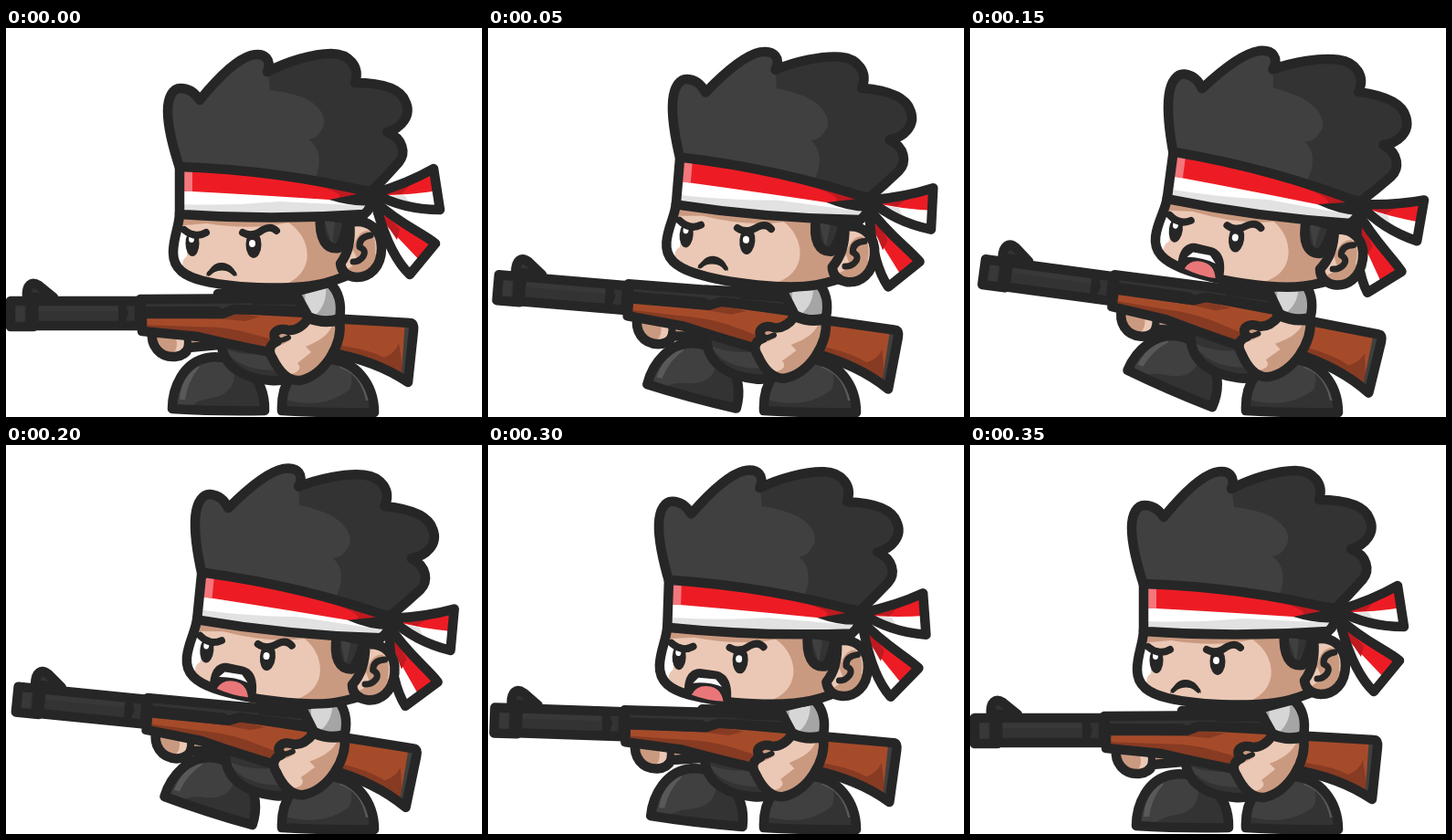
An HTML page with a canvas for the animation above (0.5 s loop, 521 by 426 pixels).

```html
<!DOCTYPE html>
<html lang="en">
<head>
<meta charset="utf-8">
<title>Recoil</title>
<style>
html, body { margin: 0; width: 100%; height: 100%; overflow: hidden; background: #fff; }
canvas { display: block; }
</style>
</head>
<body>
<canvas id="stage" width="521" height="426"></canvas>
<script>
const ctx = document.getElementById('stage').getContext('2d');
const INK = '#262626', DARK = '#333', SOFT = '#404040', SHINE = '#595959';
const SKIN = '#ebc8b5', TAN = '#ca9a80';
const RED = '#ed1c24', CRIMSON = '#be1a20', GREY = '#e2e2e2';
const WOOD = '#a64b2a', BROWN = '#873b22';
const STEP = 50, LOOP = 500, PEAK = 2, REST = 7;

function fill(d, color) {
  ctx.fillStyle = color;
  ctx.fill(new Path2D(d));
}

function line(d, width = 10.5, color = INK) {
  ctx.lineWidth = width;
  ctx.strokeStyle = color;
  ctx.stroke(new Path2D(d));
}

function oval(x, y, rx, ry, color) {
  ctx.fillStyle = color;
  ctx.beginPath();
  ctx.ellipse(x, y, rx, ry, 0, 0, Math.PI * 2);
  ctx.fill();
}

// Flat shape with clipped [path, color] shades and an ink outline.
function shape(d, color, ...shades) {
  ctx.save();
  fill(d, color);
  ctx.clip(new Path2D(d));
  shades.forEach(shade => fill(...shade));
  ctx.restore();
  line(d);
}

// Turns about (x, y) while sliding by (dx, dy); p is the amount of recoil.
function pose(p, x, y, dx, dy, degrees, draw) {
  ctx.save();
  ctx.translate(x + dx * p, y + dy * p);
  ctx.rotate(degrees * p * Math.PI / 180);
  ctx.translate(-x, -y);
  draw();
  ctx.restore();
}

function frontFoot() {
  shape('M182 417C182 394 194 366 221 361C254 356 284 382 283 419Q230 420 182 417Z', DARK,
    ['M180 425V355H235C258 372 254 400 226 405Q202 408 196 425Z', SOFT],
    ['M190 407Q192 382 208 369L212 371Q199 386 196 407Z', SHINE]);
}

function backFoot() {
  shape('M302 419C301 390 315 364 349 363C384 362 403 392 403 421Q350 422 302 419Z', DARK,
    ['M300 405Q345 420 376 396Q384 378 366 360L300 355Z', SOFT],
    ['M365 372Q388 379 394 408L397 408Q397 380 367 368Z', SHINE]);
}

function torso() {
  shape('M232 291H332L328 352C323 378 309 388 290 386C261 384 240 372 236 349Z', DARK,
    ['M237 350Q260 361 289 356L298 374Q258 378 237 350Z', SOFT]);
}

function farHand() {
  shape('M160 332C158 348 168 361 185 360Q196 359 200 350L233 347L235 333Z', TAN,
    ['M184 335H195V352L182 358Q191 348 184 335Z', SKIN],
    ['M203 335H230L224 341L202 340Z', SKIN]);
  line('M197 335Q201 344 197 354', 8);
}

function gun() {
  shape('M23 295C22 281 28 277 36 282L52 295Z', DARK);
  shape('M149 312L230 313L238 307L330 312L325 362Q260 350 210 338L149 332Z', WOOD,
    ['M149 325L205 327Q240 327 262 333L325 350V370L149 345Z', BROWN],
    ['M229 318L238 310L278 316L262 321Z', BROWN]);
  shape('M355 318L442 323Q447 323 446 331L440 388Q405 364 352 355Z', WOOD,
    ['M350 346Q394 350 414 361Q426 356 430 345L437 390L350 362Z', BROWN],
    ['M437 318H449L441 392H432Z', SOFT]);
  shape('M147 297L308 296L331 301L332 310L250 308L237 313H149Z', DARK,
    ['M150 305H232L240 309L230 316H150Z', INK],
    ['M270 299H315V303H270Z', INK]);
  shape('M30 299H146V326H30Z', DARK, ['M34 302H122V310H34Z', '#383838']);
  shape('M5 299H30V327H5Z', DARK, ['M8 302H20V323H8Z', '#383838']);
  fill('M123 300H130L134 312L130 325H123Z', INK);
  line('M24 299V326', 5);
}

function nearArm() {
  shape('M316 289L331 316Q348 324 365 318C368 302 364 288 354 279Z', '#a5a5a5',
    ['M327 287L350 282Q352 302 339 314L328 310Z', '#d6d6d6']);
  shape('M331 318Q348 325 365 320C369 346 349 380 322 386C309 387 299 376 292 362' +
    'C286 353 289 346 297 343C288 335 298 327 309 331Q321 332 331 318Z', TAN,
    ['M331 315L358 323C354 337 340 344 328 349L334 355L319 367Q327 376 308 380L288 355L289 340L315 333Z', SKIN],
    ['M292 335Q304 330 311 342L302 347Z', TAN]);
  line('M297 343Q304 342 309 339', 6);
}

function tails(p) {
  pose(p, 403, 182, -4, 1, 14, () => {
    shape('M404 190C430 214 455 224 470 236L442 270Q421 250 407 202Z', RED,
      ['M400 193L418 218L456 258L440 280L405 215Z', '#fff'],
      ['M405 193L431 220L428 232L409 204Z', CRIMSON],
      ['M407 202L420 222L425 244L410 222Z', GREY]);
    shape('M403 181Q440 170 468 154L475 199Q434 199 403 181Z', RED,
      ['M402 183Q440 184 480 177V205H400Z', '#fff'],
      ['M403 181L447 166L433 182Z', CRIMSON],
      ['M410 184L436 183L448 200H420Z', GREY]);
  });
}

function hair() {
  shape('M191 156C186 141 177 112 177 91C177 75 183 66 191 66Q204 66 212 79' +
    'C225 63 248 36 268 30C284 26 291 35 286 48C307 37 336 28 356 28' +
    'C375 28 388 42 382 60C402 60 430 63 437 80C445 96 432 110 417 114' +
    'C435 121 438 137 430 147Q416 163 400 179Q300 164 191 156Z', SOFT,
    ['M286 45L289 68Q300 69 311 72C341 78 354 98 346 110Q341 121 331 122' +
     'C343 130 347 147 337 168L460 180V20H290Z', DARK]);
}

function mouth(open) {
  if (!open) {
    fill('M219 272C223 262 229 256 237 257C246 258 251 264 253 272Q237 259 219 272Z', INK);
    line('M222 269Q236 255 250 269', 5);
    return;
  }
  fill('M211 275C210 257 216 249 227 248L245 250C258 252 264 264 262 285L216 281Z', INK);
  fill('M220 264L226 258L245 259L252 267Q237 262 220 264Z', '#fff');
  fill('M219 277Q224 266 237 267Q251 268 254 283Q236 283 219 277Z', '#e9777a');
}

function face(open) {
  shape('M190 202C190 217 183 229 183 246C183 264 196 272 216 277' +
    'C254 286 320 287 350 279Q373 273 390 262V202Z', TAN,
    ['M184 217L220 214Q270 222 309 213C333 228 340 264 309 279L280 290H180Z', SKIN],
    ['M180 222H199L198 250Q191 254 194 266L180 258Z', '#fff']);
  shape('M344 205C342 232 351 243 364 241Q372 230 374 209Z', DARK, ['M346 205H361L357 237Z', SOFT]);
  shape('M376 213C397 208 411 221 411 241C411 262 398 273 384 273Q368 272 366 258Q379 241 376 213Z', TAN,
    ['M378 214Q408 205 412 242L404 248Q406 226 396 222Q385 222 380 240Z', SKIN],
    ['M370 256L380 243L386 256L374 264Z', SKIN]);
  line('M399 227Q386 229 387 240Q395 243 391 250Q387 256 380 256', 7);
  oval(204, 236, 7.5, 14, INK);
  oval(271, 237, 8.5, 15, INK);
  oval(203, 231, 3, 4, '#fff');
  oval(269.5, 236, 3.5, 4, '#fff');
  line('M195 221Q207 231 219 224', 8);
  line('M259 224Q269 230 281 221Q290 216 296 222', 8);
  mouth(open);
}

function headband() {
  shape('M190 152Q303 156 403 181Q400 198 392 204Q290 211 190 204Z', '#fff',
    ['M185 150H410V192Q300 184 185 178Z', RED],
    ['M185 150H204V179H185Z', '#f4777c'],
    ['M320 168L400 177L403 187L360 188Q380 181 320 168Z', CRIMSON],
    ['M190 193Q245 195 300 190L400 195V215H190Z', GREY]);
  fill('M354 188L404 178L400 194Q379 196 354 188Z', INK);
}

function render(now) {
  const step = Math.min(REST, Math.floor(now % LOOP / STEP));
  const p = step < PEAK ? step / PEAK : (REST - step) / (REST - PEAK);
  const open = step >= PEAK && step < REST;

  ctx.clearRect(0, 0, 521, 426);
  ctx.lineJoin = ctx.lineCap = 'round';
  pose(p, 285, 420, -23, -4, 28, frontFoot);
  pose(p, 285, 360, 6, -4, 5, torso);
  backFoot();
  pose(p, 300, 330, 6.7, -8.2, 9.6, () => { farHand(); gun(); });
  pose(p, 330, 340, 8, -4, 4, nearArm);
  pose(p, 300, 270, 20, -3.5, 9.5, () => {
    tails(p);
    hair();
    face(open);
    headband();
  });
}

const start = performance.now();
function tick() {
  render(performance.now() - start);
  requestAnimationFrame(tick);
}
tick();
</script>
</body>
</html>
```
